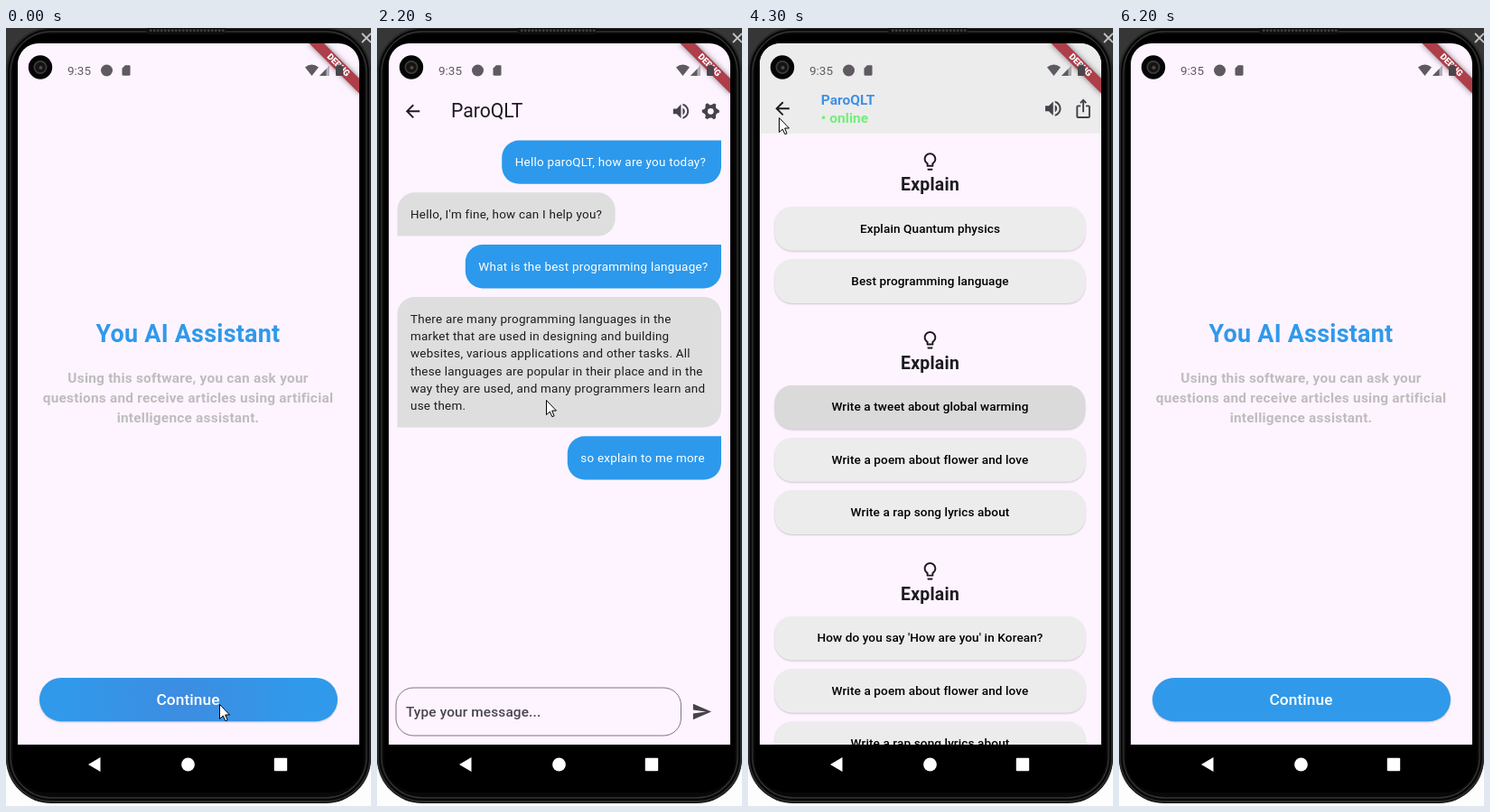
An HTML page with a canvas for the animation above (6.9 s loop, 404x862 px).

```html
<!DOCTYPE html>
<html lang="en">
<head>
<meta charset="utf-8">
<title>Chat app walkthrough</title>
<style>
html, body { margin: 0; width: 100%; height: 100%; overflow: hidden; background: #fdfdfd; }
canvas { display: block; width: 404px; height: 862px; }
</style>
</head>
<body>
<canvas id="stage"></canvas>
<script>
const W = 404, H = 862, LOOP = 6900, STEP = 100;
const DP = 0.9618; // pixels per layout unit
const SCREEN = { x: 13, y: 17, w: 378, h: 777 };
const MID_X = 201.5, MID_Y = 410;
const PAPER = '#fef4ff', BLUE = '#3099ea', INK = '#1d1b20', ICON = '#45424a';

const canvas = document.getElementById('stage');
const ctx = canvas.getContext('2d');
const ratio = window.devicePixelRatio || 1;
canvas.width = W * ratio;
canvas.height = H * ratio;

const icons = {
  back: 'M20 11H7.83l5.59-5.59L12 4l-8 8 8 8 1.41-1.41L7.83 13H20v-2z',
  volume: 'M3 9v6h4l5 5V4L7 9H3zm13.5 3c0-1.77-1.02-3.29-2.5-4.03v8.05c1.48-.73 2.5-2.25 2.5-4.02zM14 3.23v2.06c2.89.86 5 3.54 5 6.71s-2.11 5.85-5 6.71v2.06c4.01-.91 7-4.49 7-8.77s-2.99-7.86-7-8.77z',
  share: 'M16 5l-1.42 1.42-1.59-1.59V16h-1.98V4.83L9.42 6.42 8 5l4-4 4 4zm4 5v11c0 1.1-.9 2-2 2H6c-1.11 0-2-.9-2-2V10c0-1.11.89-2 2-2h3v2H6v11h12V10h-3V8h3c1.1 0 2 .89 2 2z',
  bulb: 'M9 21c0 .55.45 1 1 1h4c.55 0 1-.45 1-1v-1H9v1zm3-19C8.14 2 5 5.14 5 9c0 2.38 1.19 4.47 3 5.74V17c0 .55.45 1 1 1h6c.55 0 1-.45 1-1v-2.26c1.81-1.27 3-3.36 3-5.74 0-3.86-3.14-7-7-7zm2.85 11.1l-.85.6V16h-4v-2.3l-.85-.6C7.8 12.16 7 10.63 7 9c0-2.76 2.24-5 5-5s5 2.24 5 5c0 1.63-.8 3.16-2.15 4.1z',
  send: 'M2.01 21L23 12 2.01 3 2 10l15 2-15 2z',
  card: 'M18 2h-8L4 8v12c0 1.1.9 2 2 2h12c1.1 0 2-.9 2-2V4c0-1.1-.9-2-2-2z'
};
for (const name in icons) icons[name] = new Path2D(icons[name]);

function icon(name, cx, cy, color, size = 24 * DP) {
  ctx.save();
  ctx.translate(cx - size / 2, cy - size / 2);
  ctx.scale(size / 24, size / 24);
  ctx.fillStyle = color;
  ctx.fill(icons[name]);
  ctx.restore();
}

function text(str, x, y, { size, weight = 400, color = INK, spacing = 0, align = 'left' }) {
  ctx.font = `${weight} ${size * DP}px Roboto, sans-serif`;
  ctx.letterSpacing = `${spacing * DP}px`;
  ctx.textAlign = align;
  ctx.fillStyle = color;
  ctx.fillText(str, x, y);
}

function box(x, y, w, h, radius, color) {
  ctx.beginPath();
  ctx.roundRect(x, y, w, h, radius);
  ctx.fillStyle = color;
  ctx.fill();
}

function dot(x, y, r, color) {
  ctx.beginPath();
  ctx.arc(x, y, r, 0, Math.PI * 2);
  ctx.fillStyle = color;
  ctx.fill();
}

function poly(points, color) {
  ctx.beginPath();
  points.forEach(([x, y]) => ctx.lineTo(x, y));
  ctx.closePath();
  ctx.fillStyle = color;
  ctx.fill();
}

function raisedBox(x, y, w, h, radius, color) {
  ctx.save();
  ctx.shadowColor = 'rgba(0,0,0,.2)';
  ctx.shadowBlur = 2 * ratio;
  ctx.shadowOffsetY = ratio;
  box(x, y, w, h, radius, color);
  ctx.restore();
}

function gear(cx, cy) {
  ctx.beginPath();
  for (let i = 0; i < 24; i++) {
    const tooth = i % 4 < 2;
    const a = (i - 0.5) * Math.PI / 12 + (tooth ? 0.03 : -0.03);
    const r = tooth ? 9.6 : 7.2;
    ctx.lineTo(cx + r * Math.cos(a), cy + r * Math.sin(a));
  }
  ctx.closePath();
  ctx.moveTo(cx + 3.4, cy);
  ctx.arc(cx, cy, 3.4, 0, Math.PI * 2);
  ctx.fillStyle = ICON;
  ctx.fill('evenodd');
}

function fillPage(color) {
  ctx.fillStyle = color;
  ctx.fillRect(SCREEN.x, SCREEN.y, SCREEN.w, SCREEN.h);
}

// Pages

function homePage(t) {
  fillPage(PAPER);
  text('You AI Assistant', MID_X, 348, { size: 28, weight: 700, color: BLUE, spacing: 0.25, align: 'center' });
  const lines = [
    'Using this software, you can ask your',
    'questions and receive articles using artificial',
    'intelligence assistant.'
  ];
  lines.forEach((line, i) => text(line, MID_X, 393 + i * 22.1,
    { size: 16, weight: 700, color: '#bdbdbd', spacing: 0.25, align: 'center' }));
  raisedBox(37, 720, 330, 48.2, 24.1, BLUE);
  if (t < 100) {
    const glow = ctx.createRadialGradient(195, 745, 10, 195, 745, 135);
    glow.addColorStop(0, 'rgba(90,115,205,.3)');
    glow.addColorStop(1, 'rgba(90,115,205,0)');
    box(37, 720, 330, 48.2, 24.1, glow);
  }
  text('Continue', MID_X, 750, { size: 18, weight: 500, color: '#fff', spacing: 0.1, align: 'center' });
}

const groups = [
  ['Explain Quantum physics', 'Best programming language'],
  ['Write a tweet about global warming', 'Write a poem about flower and love', 'Write a rap song lyrics about'],
  ["How do you say 'How are you' in Korean?", 'Write a poem about flower and love', 'Write a rap song lyrics about']
];

function topicsPage(t) {
  fillPage(PAPER);
  const pressed = t >= 4300 ? Math.max(0, 1 - (t - 4300) / 500) : 0;
  let y = 150.4;
  groups.forEach((labels, g) => {
    icon('bulb', MID_X, y, INK);
    text('Explain', MID_X, y + 31.7, { size: 20, weight: 700, spacing: 0.25, align: 'center' });
    y += 49.7;
    labels.forEach((label, i) => {
      raisedBox(31.2, y, 340.4, 48.1, 19.2, '#ececec');
      if (g === 1 && i === 0 && pressed) box(31.2, y, 340.4, 48.1, 19.2, `rgba(0,0,0,${0.08 * pressed})`);
      text(label, MID_X, y + 28.3, { size: 14, weight: 500, color: '#000', spacing: 0.1, align: 'center' });
      y += 60 * DP;
    });
    y += 30.8;
  });
  ctx.fillStyle = '#ececec';
  ctx.fillRect(SCREEN.x, SCREEN.y, SCREEN.w, 102.5);
  icon('back', 39.6, 92.3, INK);
  text('ParoQLT', 82, 88.5, { size: 16, weight: 700, color: '#3f90e6' });
  text('• online', 82, 107.7, { size: 16, weight: 700, color: '#74ee78' });
  icon('volume', 336.5, 92.3, ICON);
  icon('share', 369.5, 92.3, ICON);
}

function bubble(x, y, right, h, lines, mine) {
  const r = 19.2;
  box(x, y, right - x, h, mine ? [r, 0, r, r] : [r, r, r, 0], mine ? '#2c99ec' : '#dedede');
  lines.forEach((line, i) => text(line, x + 14.5, y + 28.8 + i * 20 * DP,
    { size: 14, color: mine ? '#fff' : INK, spacing: 0.25 }));
}

function chatPage(t) {
  fillPage(PAPER);
  if (t >= 4000 && t < 4300) dot(39.6, 92.3, 18, 'rgba(73,69,79,.08)');
  icon('back', 39.6, 92.3, INK);
  text('ParoQLT', 82, 99.2, { size: 22 });
  icon('volume', 336.5, 92.3, ICON);
  gear(369.3, 92.3);
  bubble(138.2, 124.5, 381, 48.3, ['Hello paroQLT, how are you today?'], true);
  bubble(22.5, 182.3, 263.7, 48.3, ["Hello, I'm fine, how can I help you?"], false);
  bubble(97.8, 240.1, 381, 48.3, ['What is the best programming language?'], true);
  bubble(22.5, 298, 381, 144.5, [
    'There are many programming languages in the',
    'market that are used in designing and building',
    'websites, various applications and other tasks. All',
    'these languages are popular in their place and in the',
    'way they are used, and many programmers learn and',
    'use them.'
  ], false);
  bubble(210.8, 452.2, 381, 48.3, ['so explain to me more'], true);
  ctx.beginPath();
  ctx.roundRect(21, 731, 315.5, 53, 19.2);
  ctx.strokeStyle = '#7b7580';
  ctx.lineWidth = 1;
  ctx.stroke();
  text('Type your message...', 32, 763, { size: 16, weight: 500, color: '#49454f', spacing: 0.15 });
  icon('send', 359.5, 757.5, ICON);
}

// Navigation: a push grows the new page over a dimmed one, a pop shrinks the old page back
const routes = [
  { at: 0, page: homePage },
  { at: 100, page: topicsPage, below: homePage, from: 0.85 },
  { at: 2000, page: chatPage, below: topicsPage, from: 0.85 },
  { at: 4300, page: topicsPage, from: 1.1 },
  { at: 5700, page: homePage, from: 1.1 }
];

function scaled(page, t, scale) {
  ctx.save();
  ctx.translate(MID_X, MID_Y);
  ctx.scale(scale, scale);
  ctx.translate(-MID_X, -MID_Y);
  page(t);
  ctx.restore();
}

function drawRoute(t) {
  const { at, page, below, from } = routes.filter(r => r.at <= t).pop();
  const age = t - at;
  if (!from || age >= 200) return page(t);
  const left = 0.095 * Math.exp(-age / 53);
  if (below) {
    scaled(below, t, 1.05);
    fillPage('rgba(0,0,0,.6)');
  }
  scaled(page, t, 1 + (from - 1) * left);
}

// Device

function debugRibbon() {
  ctx.save();
  ctx.translate(391, 18);
  ctx.rotate(Math.PI / 4);
  ctx.shadowColor = 'rgba(0,0,0,.5)';
  ctx.shadowBlur = 6 * ratio;
  ctx.fillStyle = 'rgb(174,62,74)';
  ctx.fillRect(-40, 28 * DP, 80, 12 * DP);
  ctx.shadowColor = 'transparent';
  text('DEBUG', 0, 37.1 * DP, { size: 10.2, weight: 900, color: '#fff', align: 'center' });
  ctx.restore();
}

function statusBar() {
  const c = '#5f5a61';
  text('9:35', 68, 52, { size: 14, color: c });
  dot(111.5, 47, 6.5, c);
  icon('card', 133, 47, c, 13.6);
  ctx.beginPath();
  ctx.moveTo(338.5, 53);
  ctx.lineTo(331, 43.6);
  ctx.quadraticCurveTo(338.5, 37.6, 346, 43.6);
  ctx.closePath();
  ctx.fill();
  poly([[347, 53], [358, 41.5], [358, 53]], 'rgba(95,90,97,.45)');
  poly([[347, 53], [354.5, 45.2], [354.5, 53]], c);
  box(365, 42, 8, 11, 1, '#4b454b');
  box(367.2, 40.6, 3.6, 2, 0, '#4b454b');
}

function deviceBody() {
  ctx.fillStyle = '#fdfdfd';
  ctx.fillRect(0, 0, W, H);
  ctx.fillStyle = '#363636';
  ctx.fillRect(0, 0, W, 60);
  box(0, 0, W, 859, 50, '#080808');
  [[1, '#2a2a2a', 2], [5, '#333', 1.3]].forEach(([d, color, width]) => {
    ctx.beginPath();
    ctx.roundRect(d, d - 1, W - 2 * d, 859 - 2 * d, 50 - d);
    ctx.strokeStyle = color;
    ctx.lineWidth = width;
    ctx.stroke();
  });
  box(8, 7, 388, 840, 36, '#000');
  box(155, 0, 88, 6.5, [0, 0, 4, 4], '#111');
  for (let x = 159; x < 240; x += 4) box(x, 1.5, 2.5, 2.5, 0, '#3f3f3f');
  poly([[91, 816], [104.5, 808], [104.5, 824]], '#fff');
  dot(201.5, 816, 7.4, '#fff');
  box(296.8, 808.8, 14.4, 14.4, 1, '#fff');
}

function deviceFront() {
  dot(38, 43.5, 13.2, '#050505');
  dot(38, 43.5, 7.5, '#3c3c3c');
  dot(38, 43.5, 5.8, '#141414');
  dot(38.5, 44, 2, '#55463f');
  ctx.beginPath();
  ctx.moveTo(394, 6);
  ctx.lineTo(404, 16);
  ctx.moveTo(404, 6);
  ctx.lineTo(394, 16);
  ctx.strokeStyle = '#c4c4c4';
  ctx.lineWidth = 1.8;
  ctx.stroke();
}

// Mouse pointer: time, x, y
const track = [
  [0, 236, 749], [300, 236, 749], [700, 215, 558], [1100, 183, 407], [1500, 183, 407],
  [1800, 187, 412], [2700, 187, 412], [3000, 79, 226], [3200, 48, 145],
  [3400, 34, 107], [3600, 34, 99], [6200, 34, 99]
];

function pointer(t) {
  if (t >= 6200) return;
  const i = track.findIndex(k => k[0] > t);
  const [t0, x0, y0] = track[i - 1], [t1, x1, y1] = track[i];
  const p = (t - t0) / (t1 - t0);
  ctx.save();
  ctx.translate(x0 + (x1 - x0) * p + 0.5, y0 + (y1 - y0) * p + 0.5);
  poly([[0, 0], [0, 16], [3.8, 12.6], [6.4, 18.2], [8.6, 17.3], [6.2, 11.5], [11, 11.5]], '#fff');
  ctx.strokeStyle = '#000';
  ctx.lineWidth = 1;
  ctx.stroke();
  ctx.restore();
}

function draw(now) {
  const t = Math.floor((now % LOOP) / STEP) * STEP;
  ctx.setTransform(ratio, 0, 0, ratio, 0, 0);
  deviceBody();
  ctx.save();
  ctx.beginPath();
  ctx.roundRect(SCREEN.x, SCREEN.y, SCREEN.w, SCREEN.h, [23, 23, 0, 0]);
  ctx.clip();
  drawRoute(t);
  debugRibbon();
  statusBar();
  ctx.restore();
  deviceFront();
  pointer(t);
}

const start = performance.now();
function tick() {
  draw(performance.now() - start);
  requestAnimationFrame(tick);
}
tick();
</script>
</body>
</html>
```
